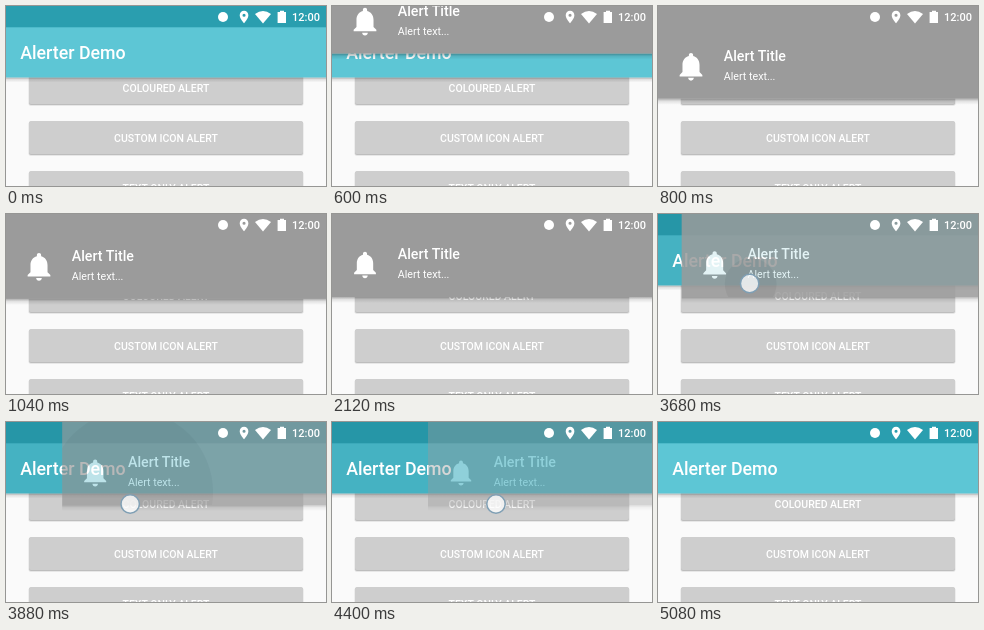
Recreate the animation shown at these times as an HTML page. Size 320 px wide and 180 px high, loop 5360 ms.

```html
<!DOCTYPE html>
<html lang="en">
<head>
<meta charset="utf-8">
<title>Alerter Demo</title>
<style>
  html, body { margin: 0; width: 100%; height: 100%; overflow: hidden; background: #fafafa; }
  svg { display: block; width: 100%; height: 100%; }
  text { font-family: Roboto, sans-serif; font-weight: 500; fill: #fff; }
</style>
</head>
<body>
<svg viewBox="0 0 320 180">
  <defs>
    <linearGradient id="shade" x2="0" y2="1">
      <stop offset="0" stop-color="#000" stop-opacity=".3"/>
      <stop offset=".4" stop-color="#000" stop-opacity=".1"/>
      <stop offset="1" stop-color="#000" stop-opacity="0"/>
    </linearGradient>
    <clipPath id="card"><rect y="-100" width="320" height="183"/></clipPath>
  </defs>

  <rect width="320" height="180" fill="#fafafa"/>
  <g id="buttons"></g>

  <rect y="71.5" width="320" height="5" fill="url(#shade)"/>
  <rect id="bar" y="21" width="320" height="50.5"/>
  <rect id="status" width="320" height="21.3"/>
  <text x="14.2" y="53" font-size="17.8">Alerter Demo</text>

  <g id="alert">
    <rect y="83" width="320" height="6" fill="url(#shade)"/>
    <rect y="-100" width="320" height="183" fill="#9b9b9b"/>
    <circle id="ripple" cx="69" cy="70" clip-path="url(#card)"/>
    <path id="bell" fill="#fff" d="M12 22c1.1 0 2-.9 2-2h-4c0 1.1.89 2 2 2zm6-6v-5c0-3.07-1.64-5.64-4.5-6.32V4c0-.83-.67-1.5-1.5-1.5s-1.5.67-1.5 1.5v.68C7.63 5.36 6 7.92 6 11v5l-2 2v1h16v-1l-2-2z"/>
    <text x="65.8" y="45.3" font-size="14.2">Alert Title</text>
    <text x="65.8" y="64" font-size="10.67" style="font-weight:400">Alert text...</text>
  </g>

  <g fill="#fff">
    <circle cx="217" cy="11" r="5"/>
    <path transform="translate(230.6 3.6) scale(.62)" d="M12 2C8.13 2 5 5.13 5 9c0 5.25 7 13 7 13s7-7.75 7-13c0-3.87-3.13-7-7-7zm0 9.5a2.5 2.5 0 0 1 0-5 2.5 2.5 0 0 1 0 5z"/>
    <path d="M249 8Q257 2 265 8L257 17.5Z"/>
    <path d="M274 6V4.8h4V6h2V17h-8.4V6Z"/>
    <text x="286" y="15.4" font-size="11">12:00</text>
  </g>

  <circle id="dot" r="9.2" fill="#fff" fill-opacity=".78" stroke="#7f9fb4" stroke-width="1.5"/>
</svg>

<script>
const LOOP = 5360;
const SLIDE = { start: 517, length: 595, height: 83 };
const PULSE = { start: 1112, half: 635, min: 0.89 };
const DRAG = { start: 3660, hold: 4400, end: 4920, grip: 68 };

const $ = id => document.getElementById(id);
const clamp = (v, lo = 0, hi = 1) => Math.min(hi, Math.max(lo, v));
const progress = (t, from, to) => clamp((t - from) / (to - from));
const attr = (id, values) => {
  for (const key in values) $(id).setAttribute(key, values[key]);
};

const linear = p => p;
const sineOut = p => Math.sin(p * Math.PI / 2);
const sineIn = p => 1 - Math.cos(p * Math.PI / 2);
const overshoot = p => { const u = p - 1; return u * u * (3 * u + 2) + 1; };

// Finger path: time, x, y, easing into the next point
const touch = [
  [3480, 64, 66, linear],
  [3640, 85, 67, linear],
  [3880, 124, 82, sineOut],
  [4220, 164, 82, linear],
  [4400, 164, 82, sineIn],
  [4920, 235, 87, linear],
  [5060, 286, 85, linear]
];

function finger(t) {
  let i = 0;
  while (i < touch.length - 2 && t >= touch[i + 1][0]) i++;
  const [t0, x0, y0, ease] = touch[i];
  const [t1, x1, y1] = touch[i + 1];
  const p = ease(progress(t, t0, t1));
  return { x: x0 + (x1 - x0) * p, y: y0 + (y1 - y0) * p };
}

function mix(a, b, p) {
  return `rgb(${a.map((v, i) => Math.round(v + (b[i] - v) * p))})`;
}

$("buttons").innerHTML = ["COLOURED ALERT", "CUSTOM ICON ALERT", "TEXT ONLY ALERT"]
  .map((label, i) => `<g transform="translate(0 ${65 + i * 50})">
    <rect x="22.5" y=".8" width="275" height="34" rx="2" opacity=".1"/>
    <rect x="23" y=".6" width="274" height="33.3" rx="2" opacity=".16"/>
    <rect x="23" width="274" height="33" rx="2" fill="#cecece"/>
    <text x="160" y="20.9" font-size="10.5" text-anchor="middle">${label}</text>
  </g>`).join("");

function draw(t) {
  const dragging = t >= DRAG.start;
  const pos = finger(t);
  const dx = dragging ? pos.x - DRAG.grip : 0;
  const slide = overshoot(progress(t, SLIDE.start, SLIDE.start + SLIDE.length));
  const alpha = t < SLIDE.start ? 0 : clamp(1 - 2 * dx / 320);
  attr("alert", {
    transform: `translate(${dx} ${(slide - 1) * SLIDE.height})`,
    opacity: alpha
  });

  const phase = Math.max(0, t - PULSE.start) / PULSE.half;
  const scale = 1 - (1 - PULSE.min) * (1 - Math.cos(phase * Math.PI)) / 2;
  attr("bell", {
    transform: `translate(33 51) scale(${1.42 * scale}) translate(-12 -12.25)`
  });

  attr("ripple", {
    r: dragging ? 20 + (t - DRAG.start) * 0.28 : 0,
    opacity: 0.06 * (1 - progress(t, 4000, DRAG.hold))
  });

  const dim = dragging ? 1 - progress(t, DRAG.hold, DRAG.end) : 0;
  attr("bar", { fill: mix([93, 198, 213], [69, 178, 194], dim) });
  attr("status", { fill: mix([42, 158, 175], [38, 150, 167], dim) });

  const pressed = t >= touch[0][0] && t < touch[touch.length - 1][0];
  attr("dot", { cx: pos.x, cy: pos.y, visibility: pressed ? "visible" : "hidden" });
}

const begin = performance.now();
function tick() {
  draw((performance.now() - begin) % LOOP);
  requestAnimationFrame(tick);
}
tick();
</script>
</body>
</html>
```
